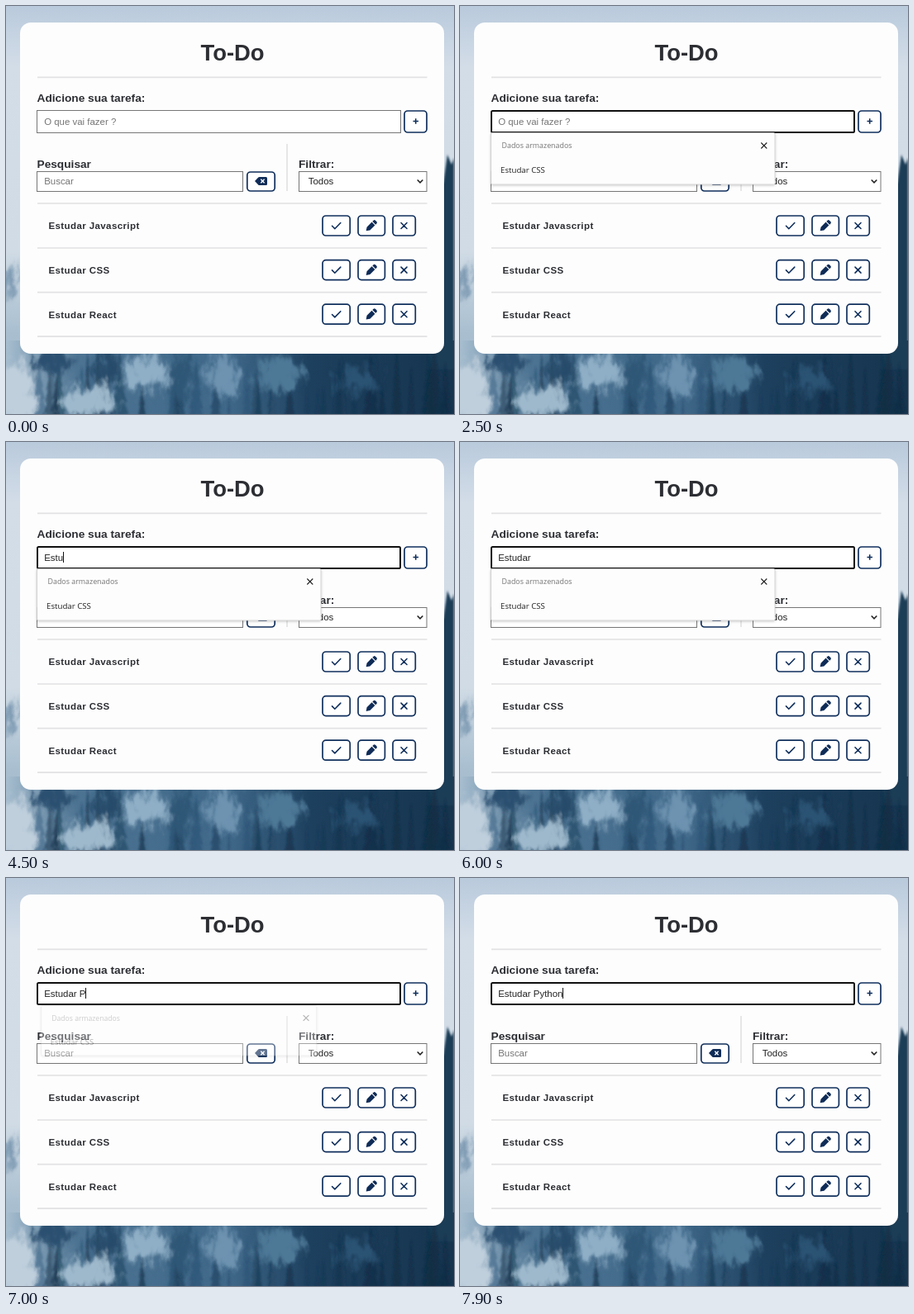
An HTML page that plays this animation: 542x494 px, repeating every 8 s.

```html
<!DOCTYPE html>
<html lang="pt">
<head>
<meta charset="utf-8">
<title>To-Do</title>
<style>
  html, body { margin: 0; width: 100%; height: 100%; overflow: hidden; background: #1b3c58; }
  svg { display: block; width: 542px; height: 494px; }
  text { font: 11.45px "Liberation Sans", Arial, sans-serif; fill: #757575; white-space: pre; }
  .title { font-size: 27.4px; font-weight: bold; fill: #2c2e33; text-anchor: middle; }
  .label { font-size: 13.7px; font-weight: bold; fill: #2c2e33; }
  .task { font-size: 11.5px; font-weight: bold; letter-spacing: .4px; fill: #2c2e33; }
  .dark { fill: #222; }
  .list text { font-family: "Open Sans", "Noto Sans", sans-serif; }
  .rule { stroke: #e2e2e4; stroke-width: 1.7; }
  .field { fill: #fff; stroke: #767676; }
  .field.focused { x: 38px; y: 127px; width: 439px; height: 26px; rx: 1.5px; stroke: #101010; stroke-width: 2; }
  .button { fill: #fff; stroke: #102f5c; stroke-width: 1.7; }
  .icon { fill: none; stroke: #102f5c; stroke-width: 1.6; stroke-linecap: round; stroke-linejoin: round; }
  .solid { fill: #0f2c57; }
  #popup { transform-origin: 209px 184.5px; }
</style>
</head>
<body>
<svg viewBox="0 0 542 494">
  <defs>
    <linearGradient id="sky" x2="0" y2="1">
      <stop offset="0" stop-color="#b9cadc"/>
      <stop offset=".15" stop-color="#d3dde8"/>
      <stop offset=".6" stop-color="#d0dbe5"/>
      <stop offset=".8" stop-color="#a9bfd0"/>
      <stop offset="1" stop-color="#9fb8cb"/>
    </linearGradient>
    <linearGradient id="forest">
      <stop offset="0" stop-color="#4c7392" stop-opacity="0"/>
      <stop offset=".16" stop-color="#4c7392"/>
      <stop offset=".5" stop-color="#3f6788"/>
      <stop offset=".68" stop-color="#1d405e"/>
      <stop offset="1" stop-color="#16344e"/>
    </linearGradient>
    <filter id="ragged" x="-10%" y="-10%" width="120%" height="120%">
      <feGaussianBlur stdDeviation="5" result="soft"/>
      <feTurbulence type="fractalNoise" baseFrequency=".07 .04" numOctaves="3" seed="8"/>
      <feDisplacementMap in="soft" scale="38" xChannelSelector="R" yChannelSelector="G"/>
    </filter>
    <filter id="soften"><feGaussianBlur stdDeviation="1.3"/></filter>
    <filter id="shadow" x="-5%" y="-10%" width="110%" height="130%">
      <feDropShadow dx="0" dy="1" stdDeviation="1.5" flood-opacity=".22"/>
    </filter>
  </defs>

  <rect width="542" height="494" fill="url(#sky)"/>
  <rect y="405" width="542" height="89" fill="url(#forest)"/>
  <path d="M519 232 525 208 529 215 534 180 539 192 542 184V440H510Z" fill="#1d3c57" filter="url(#soften)"/>
  <g id="trees" filter="url(#soften)"></g>
  <g filter="url(#ragged)">
    <ellipse cx="2" cy="335" rx="10" ry="22" fill="#7f9bb3"/>
    <ellipse cx="6" cy="470" rx="30" ry="40" fill="#bfcfdc"/>
    <ellipse cx="55" cy="430" rx="22" ry="14" fill="#2a506f"/>
    <ellipse cx="100" cy="478" rx="32" ry="18" fill="#9fb9cc"/>
    <ellipse cx="122" cy="440" rx="14" ry="26" fill="#264b6a"/>
    <ellipse cx="170" cy="445" rx="25" ry="22" fill="#8fafc6"/>
    <ellipse cx="215" cy="452" rx="14" ry="30" fill="#2f5676"/>
    <ellipse cx="262" cy="448" rx="22" ry="24" fill="#6d93b0"/>
    <ellipse cx="330" cy="445" rx="26" ry="22" fill="#4d7896"/>
    <ellipse cx="425" cy="455" rx="24" ry="14" fill="#2b5373"/>
  </g>

  <rect x="17" y="20" width="513" height="401" rx="13" fill="#fdfdfd"/>
  <text class="title" x="274" y="65.5">To-Do</text>
  <path class="rule" d="M38 86.3H509.5M38 239H509.5M340 167V224"/>
  <text class="label" x="37.5" y="115.6">Adicione sua tarefa:</text>
  <rect id="taskField" class="field" x="37.5" y="126.5" width="440" height="27"/>
  <text id="entry" x="46.2" y="143.6"></text>
  <path id="caret" d="M0 133V146" stroke="#111"/>
  <rect class="button" x="482" y="127" width="27" height="26" rx="4"/>
  <path class="icon" d="M492.5 139.5H499M495.7 136.3V142.8" style="stroke-linecap:butt"/>

  <text class="label" x="37.5" y="196.1">Pesquisar</text>
  <rect class="field" x="37.5" y="200.5" width="249" height="24"/>
  <text x="46.2" y="216.3">Buscar</text>
  <rect class="button" x="291.8" y="201" width="33.4" height="23" rx="4"/>
  <path class="solid" d="M301 212 305.2 207.6Q305.8 207 306.6 207H314.5Q316 207 316 208.5V215.5Q316 217 314.5 217H306.6Q305.8 217 305.2 216.4Z"/>
  <path d="M308.3 209.8 312.6 214.2M312.6 209.8 308.3 214.2" stroke="#fff" stroke-width="1.4"/>

  <text class="label" x="354" y="196.1">Filtrar:</text>
  <rect class="field" x="354.5" y="200.5" width="154.5" height="24"/>
  <text class="dark" x="365.7" y="216.3">Todos</text>
  <path d="M497.7 210.5 501 213.8 504.3 210.5" fill="none" stroke="#222" stroke-width="1.6"/>
  <g id="tasks"></g>

  <g id="popup" class="list">
    <rect x="37.5" y="153.5" width="343.5" height="62.5" rx="1.5" fill="#fdfdfd" stroke="#c9c9c9" stroke-width=".8" filter="url(#shadow)"/>
    <text x="50.5" y="172.2" style="font-size:8.9px">Dados armazenados</text>
    <path d="M364.3 165.5 371.3 172.5M371.3 165.5 364.3 172.5" stroke="#222" stroke-width="1.1"/>
    <text class="dark" x="49" y="202.2" style="font-size:9.7px">Estudar CSS</text>
  </g>
</svg>
<script>
const LOOP = 8000, FOCUS = 900, CLOSE = 6900;
const WORDS = "Estudar Python";
const KEYS = [3600, 3900, 4200, 4500, 4700, 4900, 5100, 6300, 6900, 7400, 7600, 7700, 7800, 7900];
const CARET_ON = [FOCUS, 1900, 3000, 6100, ...KEYS];
const CLOSING = [{ opacity: .8, scale: .99 }, { opacity: .35, scale: .97 }];
const $ = id => document.getElementById(id);

function seeded(seed) {
  return () => (seed = (seed * 16807) % 2147483647) / 2147483647;
}

function plantTrees() {
  const random = seeded(41);
  const tones = ["#0f2b43", "#173955", "#2b5272", "#3c6484"];
  let html = "";
  for (let i = 0; i < 50; i++) {
    const x = 40 + random() * 502, top = 410 + random() * 55, half = 6 + random() * 9;
    const tone = tones[Math.floor(random() * (x > 340 ? 2 : 4))];
    let left = "", right = "";
    for (let k = 1; k <= 6; k++) {
      const y = top + k * 15, w = half * k / 6;
      left = `L${x - w * .6} ${y} ${x - w} ${y}` + left;
      right += `L${x + w} ${y} ${x + w * .6} ${y}`;
    }
    html += `<path d="M${x} ${top}${right}${left}Z" fill="${tone}" opacity="${.25 + random() * .35}"/>`;
  }
  $("trees").innerHTML = html;
}

function taskRow(name, y) {
  const button = (x, w) => `<rect class="button" x="${x}" y="${y - 12}" width="${w}" height="24" rx="4"/>`;
  return `<text class="task" x="51.5" y="${y + 4.3}">${name}</text>
    ${button(383, 33.2)}${button(426, 32.4)}${button(468, 27.3)}
    <path class="icon" d="M394.5 ${y + .3}l3.3 3.4 7-7.2M478 ${y - 3.5}l7 7m0-7l-7 7"/>
    <g transform="translate(442 ${y}) rotate(-45)">
      <path class="solid" d="M-9 0-5-2.7H3.5V2.7H-5ZM4.6-2.7H6.3Q8-2.7 8-1V1Q8 2.7 6.3 2.7H4.6Z"/>
    </g>
    <path class="rule" d="M38 ${y + 27}H509.5"/>`;
}

function render(t) {
  const typed = WORDS.slice(0, KEYS.filter(k => k <= t).length);
  const focused = t >= FOCUS;
  const entry = $("entry"), popup = $("popup");

  const content = typed || "O que vai fazer ?";
  if (entry.textContent !== content) entry.textContent = content;
  entry.style.fill = typed ? "#222" : "#757575";
  $("taskField").classList.toggle("focused", focused);

  const caretX = 46.2 + (typed ? entry.getComputedTextLength() : 0);
  $("caret").setAttribute("transform", `translate(${Math.floor(caretX) + .5} 0)`);
  $("caret").style.opacity = CARET_ON.some(on => t >= on && t < on + 500) ? 1 : 0;

  const step = Math.floor((t - CLOSE) / 100);
  const pose = step < 0 ? { opacity: focused ? 1 : 0, scale: 1 } : CLOSING[step] || { opacity: 0, scale: .97 };
  popup.style.opacity = pose.opacity;
  popup.style.transform = `scale(${pose.scale})`;
}

plantTrees();
$("tasks").innerHTML = ["Javascript", "CSS", "React"]
  .map((topic, i) => taskRow("Estudar " + topic, 266 + i * 53.6)).join("");

const start = performance.now();
function tick() {
  render((performance.now() - start) % LOOP);
  requestAnimationFrame(tick);
}
tick();
</script>
</body>
</html>
```
